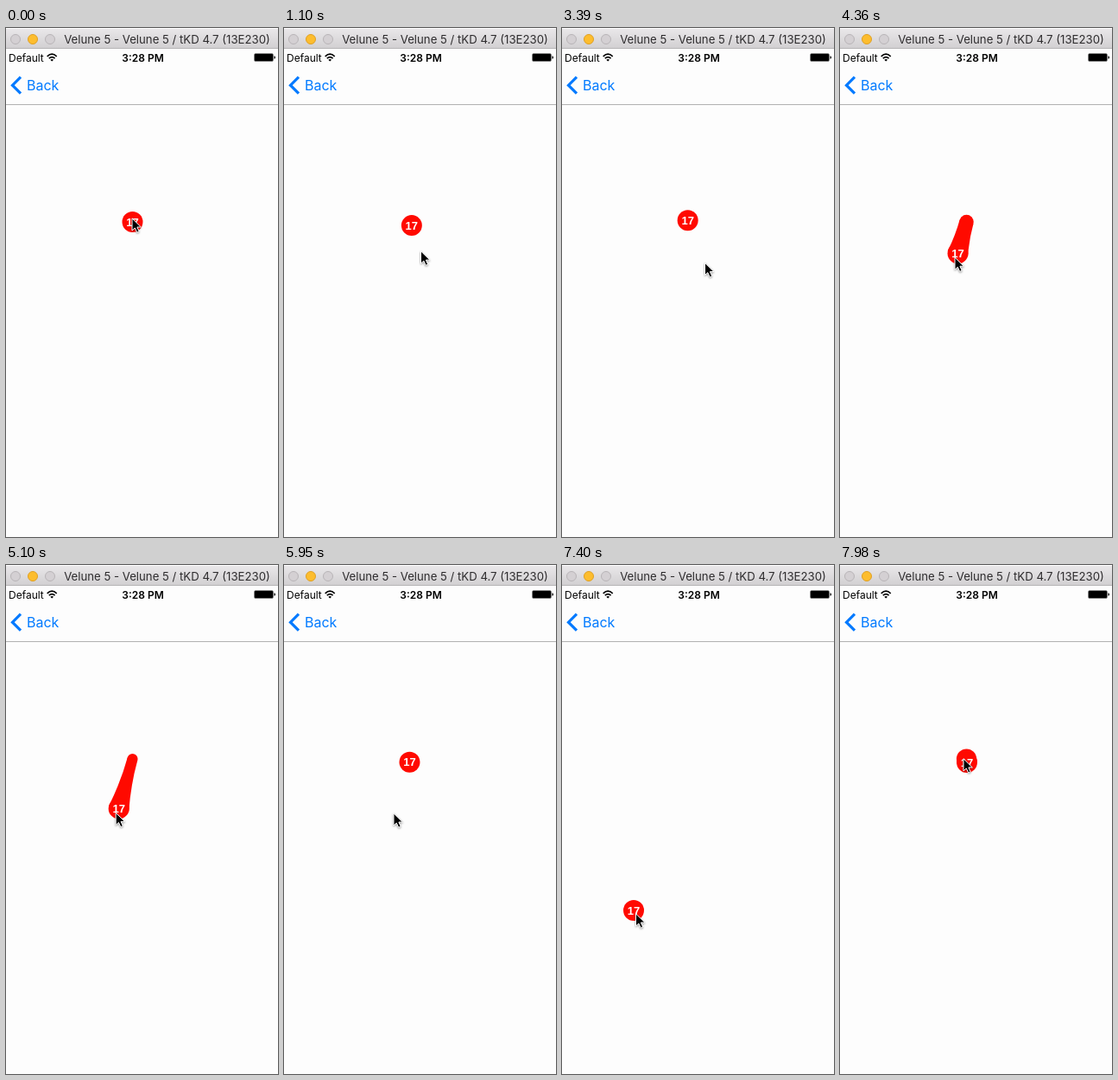
Recreate the animation shown at these times as an HTML page. Size 315x588 px, loop 8000 ms.

```html
<!DOCTYPE html>
<html lang="en">
<head>
<meta charset="utf-8">
<title>Elastic badge</title>
<style>
  html, body { margin: 0; width: 100%; height: 100%; overflow: hidden; background: #fdfdfd; }
  svg { display: block; width: 315px; height: 588px; font-family: Inter, "Noto Sans", sans-serif; }
  #pointer { filter: drop-shadow(0 1px 1px rgba(0, 0, 0, .4)); }
</style>
</head>
<body>
<svg viewBox="0 0 315 588">
  <defs>
    <linearGradient id="bar" x2="0" y2="1">
      <stop stop-color="#e9e7e9"/>
      <stop offset="1" stop-color="#d2d0d2"/>
    </linearGradient>
  </defs>
  <rect width="315" height="588" fill="#fdfdfd"/>

  <!-- window title bar -->
  <rect y="1" width="315" height="22" fill="url(#bar)"/>
  <rect y="23" width="315" height="1" fill="#b6b4b6"/>
  <g fill="#d4d0d3" stroke="#b8b4b7">
    <circle cx="11" cy="13" r="5.5"/>
    <circle cx="31" cy="13" r="5.5" fill="#fdbd2e" stroke="#dfa023"/>
    <circle cx="51" cy="13" r="5.5"/>
  </g>
  <text x="186.5" y="18" font-size="13.2" fill="#2e2c2e" text-anchor="middle">Velune 5 - Velune 5 / tKD 4.7 (13E230)</text>

  <!-- status bar -->
  <text x="3" y="38.5" font-size="12">Default</text>
  <g fill="none" stroke="#000" stroke-width="1.7">
    <path d="M47.7 32.8Q53.2 27.6 58.7 32.8M49.8 35.2Q53.2 32.2 56.6 35.2"/>
    <path d="M53.2 38.6L51.3 36.8Q53.2 35.4 55.1 36.8Z" fill="#000" stroke="none"/>
  </g>
  <text x="158.5" y="38.5" font-size="12" font-weight="600" text-anchor="middle">3:28 PM</text>
  <rect x="287.5" y="29.5" width="22" height="9" rx="1.5" stroke="#888" stroke-width=".6"/>
  <path d="M310.5 32.3Q312 32.6 312 34T310.5 35.8Z"/>

  <!-- navigation bar -->
  <path d="M17 56.7L7.5 66.2L17 75.7" fill="none" stroke="#007aff" stroke-width="3.2"/>
  <text x="24" y="72" font-size="16" fill="#007aff">Back</text>
  <rect y="88" width="315" height="1" fill="#b2b2b2"/>

  <!-- elastic badge and pointer -->
  <g fill="#ff0a00">
    <circle id="anchor"/>
    <path id="bridge"/>
  </g>
  <g id="badge">
    <circle r="12" fill="#ff0a00"/>
    <text y="4.6" font-size="13" font-weight="700" fill="#fff" text-anchor="middle"
          font-family="Liberation Sans, sans-serif">17</text>
  </g>
  <path id="pointer" d="M-.5 -.2V14L2.8 11L5.2 16.2L7.7 15.1L5.4 10H9.9Z" stroke="#fff"/>
</svg>
<script>
const LOOP = 8000;
const HOME = { x: 146.5, y: 224 };
const RADIUS = 12;
const BREAK_DISTANCE = 80;
const GLIDE = 400;

const vec = (x, y) => ({ x, y });
const add = (a, b) => vec(a.x + b.x, a.y + b.y);
const scale = (a, k) => vec(a.x * k, a.y * k);
const mix = (a, b, p) => add(scale(a, 1 - p), scale(b, p));
const clamp = p => Math.min(1, Math.max(0, p));

// grip: pointer relative to the badge centre; pull: final displacement from home.
// bend: two control points for a pull that sweeps around instead of going straight.
const gestures = [
  { grab: 270, reach: 510, release: 800, grip: vec(0, -4), pull: vec(12.5, 38) },
  { grab: 1990, reach: 2690, release: 2960, grip: vec(1.5, 8.5), pull: vec(18, 39) },
  { grab: 3800, reach: 5250, release: 5630, grip: vec(-3, 5), pull: vec(-16, 58) },
  { grab: 6740, reach: 7560, release: 7560, grip: vec(3, 4), pull: vec(-23, 60),
    bend: [vec(91, 0), vec(-158, 380)] },
  { grab: 7880, reach: 8000, release: 8000, grip: vec(-3.5, -4), pull: vec(.5, 4) }
];

// Cubic Bezier; without a bend it is a straight pull that eases out.
function pulled({ grab, reach, pull, bend = [scale(pull, 2 / 3), pull] }, t) {
  const p = clamp((t - grab) / (reach - grab)), q = 1 - p;
  const sum = add(scale(bend[0], 3 * p * q * q), scale(bend[1], 3 * p * p * q));
  return add(HOME, add(sum, scale(pull, p ** 3)));
}

function spring(age) {
  return Math.exp(-.007 * age) * Math.cos(Math.PI * age / 140);
}

function stateAt(t) {
  const index = gestures.findLastIndex(g => g.grab <= t);
  const gesture = gestures[Math.max(0, index)], next = gestures[index + 1];
  const held = index >= 0 && t < gesture.release;
  const hand = pulled(gesture, Math.min(t, gesture.release));
  let badge = hand, pointer = add(hand, gesture.grip);

  if (!held && index >= 0) {
    badge = mix(HOME, hand, spring(t - gesture.release));
    const start = Math.max(gesture.release, next.grab - GLIDE);
    const p = clamp((t - start) / (next.grab - start));
    pointer = mix(pointer, add(HOME, next.grip), p * p * (3 - 2 * p));
  }
  return { badge, pointer, held };
}

// Sides bend inward between the shrinking anchor and the badge.
function drawBridge({ x, y }, held) {
  const dx = x - HOME.x, dy = y - HOME.y, distance = Math.hypot(dx, dy);
  const attached = held && distance < BREAK_DISTANCE;
  const r = RADIUS - distance / 10;
  anchor.setAttribute("r", attached ? r : 0);
  if (!attached || distance < .1) return bridge.setAttribute("d", "");
  const nx = -dy / distance, ny = dx / distance;
  const point = (along, side) =>
    `${HOME.x + dx * along + nx * side} ${HOME.y + dy * along + ny * side}`;
  bridge.setAttribute("d",
    `M${point(0, r)}Q${point(.5, r)} ${point(1, RADIUS)}` +
    `L${point(1, -RADIUS)}Q${point(.5, -r)} ${point(0, -r)}Z`);
}

const [anchor, bridge, badgeNode, pointerNode] =
  ["anchor", "bridge", "badge", "pointer"].map(id => document.getElementById(id));
const place = (node, { x, y }) => node.setAttribute("transform", `translate(${x} ${y})`);
anchor.setAttribute("cx", HOME.x);
anchor.setAttribute("cy", HOME.y);

const start = performance.now();
function frame() {
  const { badge, pointer, held } = stateAt((performance.now() - start) % LOOP);
  drawBridge(badge, held);
  place(badgeNode, badge);
  place(pointerNode, pointer);
  requestAnimationFrame(frame);
}
frame();
</script>
</body>
</html>
```
